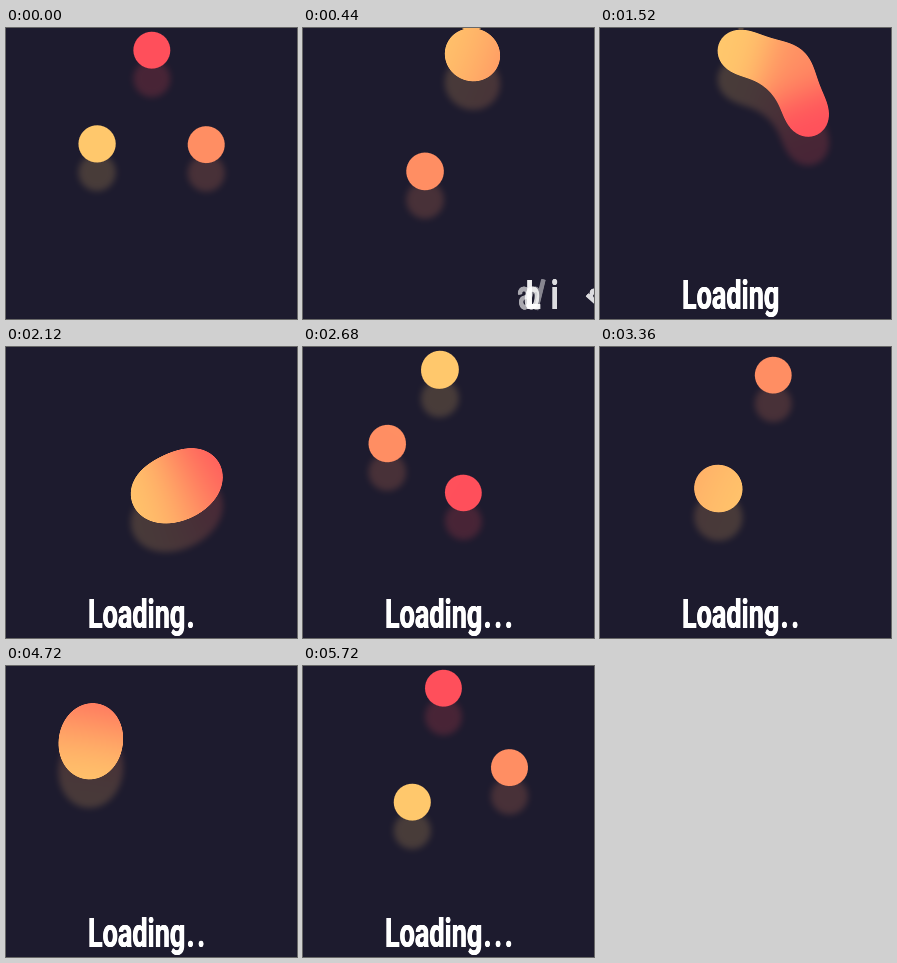
An HTML page with a canvas that plays this animation: 291 px wide and 291 px high, repeating every 5.76 s.

```html
<!DOCTYPE html>
<html lang="en">
<head>
<meta charset="utf-8">
<title>Loading</title>
<style>
  html, body { margin: 0; width: 100%; height: 100%; overflow: hidden; background: #1d1b2e; }
  #stage { position: relative; width: 291px; height: 291px; overflow: hidden; }
  canvas { position: absolute; left: 0; top: 0; }
  #shadow { transform: translateY(28.5px); filter: blur(3.4px); opacity: .19; }
  #label {
    position: absolute; left: 82px; top: 246.2px;
    font: 700 41.5px/42px Roboto, "Open Sans", sans-serif;
    color: #fff; white-space: pre;
    text-shadow: .5px 0 #fff, -.5px 0 #fff;
    transform: scaleX(.65); transform-origin: 0 0;
  }
  #label span { display: inline-block; transform-origin: 50% 62%; }
  #label .dot { margin-left: 2.2px; margin-right: 2px; }
</style>
</head>
<body>
<div id="stage">
  <canvas id="shadow" width="291" height="198"></canvas>
  <canvas id="goo" width="291" height="198"></canvas>
  <div id="label"></div>
</div>
<script>
const LOOP = 5760, TURN = 5800;
const W = 291, H = 198, CELL = 3, GW = W / CELL, GH = H / CELL;
const CX = 145.8, CY = 85, ORBIT = 63, RADIUS = 18.5;
const SIGMA = 23.5 / CELL, LEVEL = .2001, SHARP = 170;

// Painted in this order; each ball marks its own colour channel.
const balls = [
  { start: 0,   speed: 1, mark: '#f00', rgb: [255, 79, 91] },
  { start: 120, speed: 3, mark: '#0f0', rgb: [255, 142, 99] },
  { start: 240, speed: 5, mark: '#00f', rgb: [255, 200, 108] }
];
const linear = balls.map(b => b.rgb.map(v => (v / 255) ** 2.2));

const context = id => document.getElementById(id).getContext('2d');
const goo = context('goo'), shadow = context('shadow');
const image = goo.createImageData(W, H);

const maskCanvas = document.createElement('canvas');
maskCanvas.width = GW;
maskCanvas.height = GH;
const mask = maskCanvas.getContext('2d', { willReadFrequently: true });

const reach = Math.ceil(SIGMA * 3.4);
const kernel = Array.from({ length: reach * 2 + 1 },
  (_, i) => Math.exp(-((i - reach) ** 2) / (2 * SIGMA * SIGMA)));
const total = kernel.reduce((a, b) => a + b);
kernel.forEach((v, i) => kernel[i] = v / total);

const field = new Float32Array(GW * GH * 3);
const half = new Float32Array(GW * GH * 3);

function drawMask(t) {
  mask.setTransform(1, 0, 0, 1, 0, 0);
  mask.fillStyle = '#000';
  mask.fillRect(0, 0, GW, GH);
  mask.scale(1 / CELL, 1 / CELL);
  for (const b of balls) {
    const a = (b.start + b.speed * 360 * t / TURN) * Math.PI / 180;
    mask.fillStyle = b.mark;
    mask.beginPath();
    mask.arc(CX + ORBIT * Math.sin(a), CY - ORBIT * Math.cos(a), RADIUS, 0, 7);
    mask.fill();
  }
}

// One axis of the blur; count cells along it, step between them.
function blur(src, dst, lines, lineStep, count, step) {
  for (let l = 0; l < lines; l++) {
    for (let i = 0; i < count; i++) {
      const lo = Math.max(0, i - reach), hi = Math.min(count - 1, i + reach);
      let r = 0, g = 0, b = 0;
      for (let j = lo; j <= hi; j++) {
        const k = kernel[j - i + reach], p = l * lineStep + j * step;
        r += k * src[p];
        g += k * src[p + 1];
        b += k * src[p + 2];
      }
      const q = l * lineStep + i * step;
      dst[q] = r;
      dst[q + 1] = g;
      dst[q + 2] = b;
    }
  }
}

function drawGoo(t) {
  drawMask(t);
  const px = mask.getImageData(0, 0, GW, GH).data;
  for (let i = 0; i < GW * GH; i++)
    for (let c = 0; c < 3; c++) field[i * 3 + c] = px[i * 4 + c] / 255;
  blur(field, half, GH, GW * 3, GW, 3);
  blur(half, field, GW, 3, GH, GW * 3);

  const out = image.data, weight = [0, 0, 0];
  out.fill(0);
  for (let y = 0; y < H; y++) {
    const gy = Math.min(GH - 1, Math.max(0, (y + .5) / CELL - .5));
    const y0 = Math.min(GH - 2, Math.floor(gy)), fy = gy - y0;
    for (let x = 0; x < W; x++) {
      const gx = Math.min(GW - 1, Math.max(0, (x + .5) / CELL - .5));
      const x0 = Math.min(GW - 2, Math.floor(gx)), fx = gx - x0;
      const p = (y0 * GW + x0) * 3, q = p + GW * 3;
      for (let c = 0; c < 3; c++) {
        const top = field[p + c] * (1 - fx) + field[p + 3 + c] * fx;
        const low = field[q + c] * (1 - fx) + field[q + 3 + c] * fx;
        weight[c] = top * (1 - fy) + low * fy;
      }
      const sum = weight[0] + weight[1] + weight[2];
      const cover = (sum - LEVEL) * SHARP + .5;
      if (cover <= 0) continue;
      const o = (y * W + x) * 4;
      for (let c = 0; c < 3; c++) {
        const v = weight[0] * linear[0][c] + weight[1] * linear[1][c] + weight[2] * linear[2][c];
        out[o + c] = 255 * (v / sum) ** (1 / 2.2);
      }
      out[o + 3] = 255 * Math.min(1, cover);
    }
  }
  goo.putImageData(image, 0, 0);
  shadow.putImageData(image, 0, 0);
}

// Each letter: slide distance, tilt in degrees, fade.
const letters = [
  ['L', 246, 0, .1], ['o', 218, 9, .25], ['a', 180, -12, .5], ['d', 170, 18, .7],
  ['i', 186, 0, .2], ['n', 245, -64, .2], ['g', 416, 18, .1]
];
const label = document.getElementById('label');
function addSpan(text, name) {
  const el = document.createElement('span');
  el.textContent = text;
  el.className = name;
  return label.appendChild(el);
}
const glyphs = letters.map(l => addSpan(l[0], 'letter'));
const dots = [1, 2, 3].map(() => addSpan('.', 'dot'));

const NARROW = .65, SLIDE_FROM = 120, SLIDE_TIME = 1320;
const DOTS_FROM = 1840, DOT_TIME = 300, DOT_STEPS = 10;

function drawLabel(t) {
  const u = Math.min(1, Math.max(0, 1 - (t - SLIDE_FROM) / SLIDE_TIME));
  letters.forEach(([, slide, tilt, fade], i) => {
    const s = glyphs[i].style;
    s.transform = u
      ? `translateX(${slide * u * u / NARROW}px) scaleX(${1 / NARROW}) rotate(${tilt * u}deg) scaleX(${NARROW})`
      : 'none';
    s.opacity = Math.max(0, 1 - fade * u);
    s.visibility = t < SLIDE_FROM ? 'hidden' : 'visible';
  });
  const step = Math.min(DOT_STEPS, Math.floor((t - DOTS_FROM) / DOT_TIME));
  const shown = step < 0 ? 0 : (step + 1) % 4;
  dots.forEach((d, i) => d.style.visibility = i < shown ? 'visible' : 'hidden');
}

const began = performance.now();
function frame() {
  const t = (performance.now() - began) % LOOP;
  drawGoo(t);
  drawLabel(t);
  requestAnimationFrame(frame);
}
frame();
</script>
</body>
</html>
```
